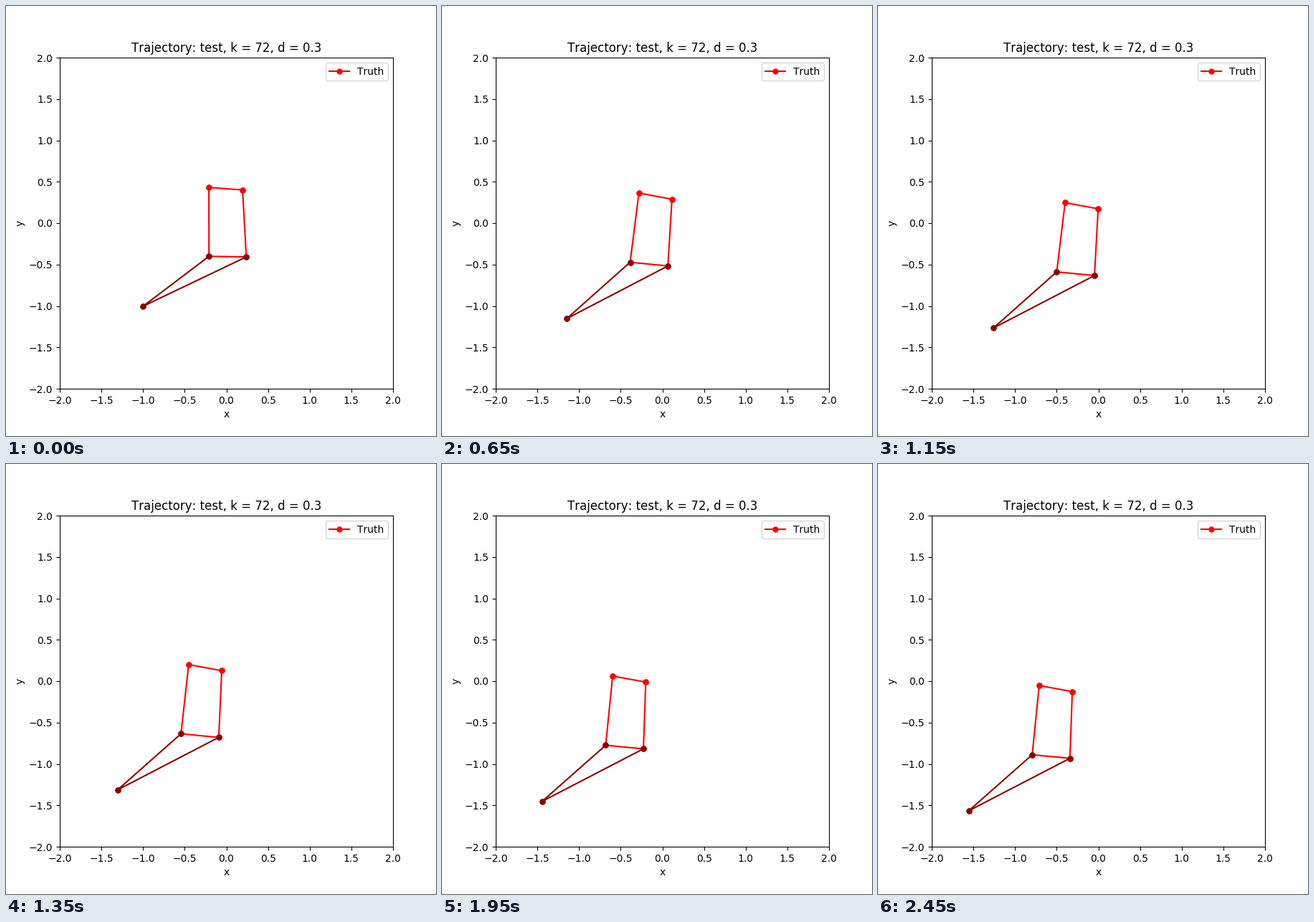
These frames come from a looping animation (600 px wide and 600 px high, 2.5 s). A matplotlib script:

```python
import numpy as np
import matplotlib.pyplot as plt
from matplotlib.animation import FuncAnimation

FRAMES, INTERVAL = 50, 50

TIP_START = np.array([-1.0, -1.004])
TIP_SPEED = np.array([-0.227, -0.2295])  # units per second
SWAY = np.array([0.02, 0])

# Node offsets from the tip: at the start, and once the springs have settled
LOW_LEFT = (0.791, 0.603), (0.762, 0.677)
LOW_RIGHT = (1.239, 0.596), (1.215, 0.634)
TOP_LEFT = (0.789, 1.435), (0.846, 1.513)
TOP_RIGHT = (1.193, 1.406), (1.243, 1.440)


def settle(t, node):
    """Offset of a node, as a damped spring released from its start."""
    start, rest = map(np.array, node)
    return rest + (start - rest) * np.exp(-3 * t) * np.cos(3 * t)


def pose(t):
    """Corners of the box, in order, and the tip at t seconds."""
    tip = TIP_START + TIP_SPEED * t
    sway = SWAY * np.exp(-((t - 0.85) / 0.5) ** 2)
    box = [tip + settle(t, LOW_LEFT),
           tip + settle(t, LOW_RIGHT),
           tip + settle(t, TOP_RIGHT) + sway,
           tip + settle(t, TOP_LEFT) + sway]
    return box, tip


# Kern glyph pairs on whole pixels
plt.rcParams["text.kerning_factor"] = 6

fig, ax = plt.subplots(figsize=(6, 6), dpi=100)
ax.set(xlim=(-2, 2), ylim=(-2, 2), xlabel="x", ylabel="y",
       title="Trajectory: test, k = 72, d = 0.3")
lines = [ax.plot([], [], "o-", color=color, markersize=5)[0]
         for color in ["red"] * 4 + ["darkred"] * 2]
ax.legend([lines[0]], ["Truth"], loc="upper right")


def update(i):
    box, tip = pose(i * INTERVAL / 1000)
    edges = list(zip(box, box[1:] + box[:1]))
    edges += [(tip, box[0]), (tip, box[1])]
    for line, edge in zip(lines, edges):
        line.set_data(*zip(*edge))
    return lines


anim = FuncAnimation(fig, update, frames=FRAMES, interval=INTERVAL,
                     repeat=True, repeat_delay=0)
plt.show()
```
